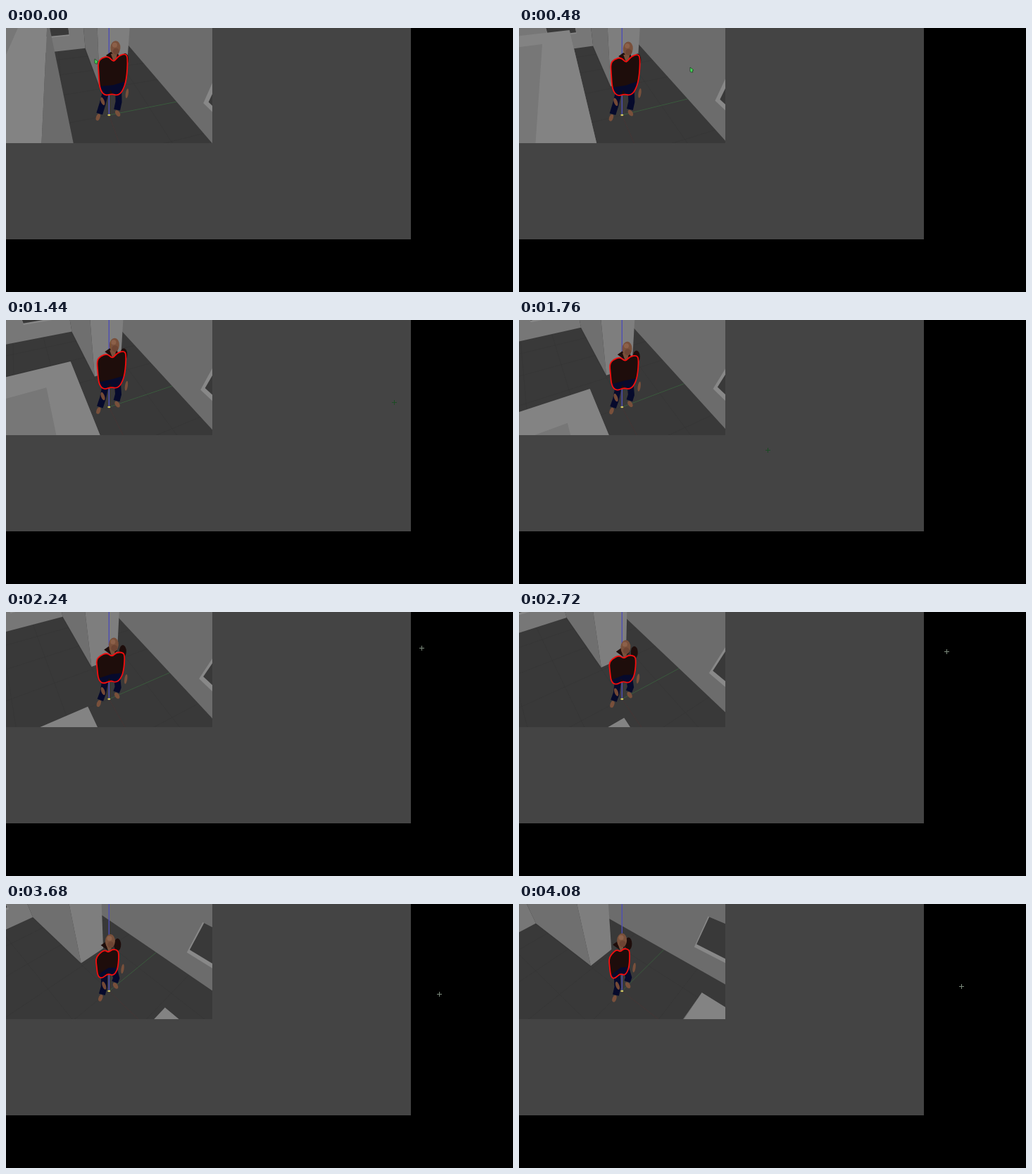
Recreate the animation shown at these times as an HTML page with a canvas. Size 720 px wide and 376 px high, loop 4.16 s.

```html
<!DOCTYPE html>
<html lang="en">
<head>
<meta charset="utf-8">
<title>Orbiting viewport</title>
<style>
html, body { margin: 0; width: 100%; height: 100%; overflow: hidden; background: #000; }
canvas { display: block; }
</style>
</head>
<body>
<canvas id="stage" width="720" height="376"></canvas>
<script>
const ctx = document.getElementById('stage').getContext('2d');
const LOOP = 4160, STEP = 80;
const VIEW = { w: 293, h: 164 };
const FOCAL = 248, PIVOT_DROP = 42, NEAR = 0.03;

// Room, in units of the camera distance: g along the green axis, b against the red one
const WALL_G = 0.437, WALL_B = 0.922, HIGH = 0.8;
const PILLAR = { g0: 0.006, g1: 0.197, b: 0.272 };
const BLOCK = { g: -0.2025, b: -0.338, top: 0.649, rim: 0.042 };
const REST = { from: 1120, length: 240 };

// Time, yaw and pitch of the orbit
const ORBIT = [
  [0, 15, 37], [480, 18, 39], [960, 21, 41.8], [1520, 24, 47.3],
  [2000, 26.5, 50], [3040, 37, 52.4], [3840, 48.5, 50.5]
];
// Time, x and y of the pointer
const POINTER = [
  [0, 128, 48], [480, 245, 60], [960, 421, 80], [1120, 590, 92], [1360, 600, 100],
  [1760, 353, 185], [1840, 380, 203], [2240, 590, 51], [3040, 619, 60],
  [3280, 584, 31], [3600, 622, 50], [3840, 600, 284], [4080, 628, 117]
];
// Sweater outline as g, z
const SWEATER = [
  [-0.043, 0.329], [-0.025, 0.35], [0.009, 0.354], [0.034, 0.317], [0.057, 0.35],
  [0.091, 0.357], [0.106, 0.335], [0.108, 0.2], [0.088, 0.124], [0.061, 0.1],
  [0.029, 0.12], [-0.015, 0.115], [-0.041, 0.172], [-0.042, 0.269]
];

const clamp = k => Math.min(1, Math.max(0, k));
const mix = (a, b, k) => a + (b - a) * k;

function blend(keys, t) {
  let i = 0;
  while (i < keys.length - 2 && t >= keys[i + 1][0]) i++;
  const [from, to] = [keys[i], keys[i + 1]];
  const k = clamp((t - from[0]) / (to[0] - from[0]));
  return from.slice(1).map((v, j) => mix(v, to[j + 1], k));
}

let sinYaw, cosYaw, sinPitch, cosPitch;

function aim(t) {
  const rested = Math.min(Math.max(t - REST.from, 0), REST.length);
  const [yaw, pitch] = blend(ORBIT, t - rested).map(a => a * Math.PI / 180);
  [sinYaw, cosYaw, sinPitch, cosPitch] = [Math.sin(yaw), Math.cos(yaw), Math.sin(pitch), Math.cos(pitch)];
}

// World to camera: right, up, depth
function toCamera([g, b, z]) {
  const away = g * sinYaw + b * cosYaw;
  return [g * cosYaw - b * sinYaw, z * cosPitch + away * sinPitch, 1 + away * cosPitch - z * sinPitch];
}

const toScreen = ([u, v, d]) => [146.3 + FOCAL * u / d, 82 + (PIVOT_DROP - FOCAL * v) / d];
const project = (g, b, z) => toScreen(toCamera([g, b, z]));

function clipNear(points) {
  const kept = [];
  points.forEach((p, i) => {
    const q = points[(i + 1) % points.length];
    if (p[2] >= NEAR) kept.push(p);
    if ((p[2] >= NEAR) !== (q[2] >= NEAR)) {
      const k = (NEAR - p[2]) / (q[2] - p[2]);
      kept.push(p.map((v, j) => mix(v, q[j], k)));
    }
  });
  return kept;
}

function trace(points, closed = true) {
  ctx.beginPath();
  points.forEach(([x, y]) => ctx.lineTo(x, y));
  if (closed) ctx.closePath();
}

function fill(color, points) {
  trace(points);
  ctx.fillStyle = color;
  ctx.fill();
}

function stroke(color, width, points) {
  trace(points, false);
  ctx.strokeStyle = color;
  ctx.lineWidth = width;
  ctx.stroke();
}

function oval(color, [x, y], rx, ry, turn = 0) {
  ctx.beginPath();
  ctx.ellipse(x, y, rx, ry, turn, 0, Math.PI * 2);
  ctx.fillStyle = color;
  ctx.fill();
}

const flatten = corners => clipNear(corners.map(toCamera)).map(toScreen);
const face = (color, ...corners) => fill(color, flatten(corners));
const segment = (color, width, a, b) => stroke(color, width, flatten([a, b]));

const wallAcross = (b, g0, g1, z0, z1) => [[g0, b, z0], [g1, b, z0], [g1, b, z1], [g0, b, z1]];
const wallAlong = (g, b0, b1, z0, z1) => [[g, b0, z0], [g, b1, z0], [g, b1, z1], [g, b0, z1]];

// An opening whose dark pane sits a little deeper in the wall
function recess(plane, depth, ...bounds) {
  ctx.save();
  face('#888', ...plane(depth, ...bounds));
  ctx.clip();
  face('#393939', ...plane(depth + 0.03, ...bounds));
  ctx.restore();
}

function drawRoom() {
  ctx.fillStyle = '#393939';
  ctx.fillRect(0, 0, VIEW.w, VIEW.h);
  for (let i = -4; i <= 4; i++) {
    const at = i * 0.25;
    segment('#353535', 0.6, [at, -0.5, 0], [at, 1, 0]);
    segment('#353535', 0.6, [-1, at, 0], [1, at, 0]);
  }
  segment('#4d3737', 0.7, [0, 0, 0], [0, -0.45, 0]);
  segment('#3d6540', 0.8, [0, 0, 0], [WALL_G, 0, 0]);

  face('#777', ...wallAcross(WALL_B, -2, PILLAR.g0, 0, HIGH));
  recess(wallAcross, WALL_B, -0.37, -0.129, 0.14, 0.4);
  face('#6c6c6c', ...wallAlong(WALL_G, -1, 2, 0, HIGH));
  recess(wallAlong, WALL_G, -0.6, -0.177, 0.146, 0.36);

  const { g0, g1, b } = PILLAR;
  face('#6f6f6f', ...wallAlong(g0, b, WALL_B, 0, HIGH));
  face('#7e7e7e', ...wallAcross(b, g0, g1, 0, HIGH));

  face('#6b6b6b', ...wallAlong(BLOCK.g, BLOCK.b, -2, 0, BLOCK.top));
  const lid = inset => [[-2, -2], [BLOCK.g - inset, -2], [BLOCK.g - inset, BLOCK.b - inset], [-2, BLOCK.b - inset]]
    .map(([x, y]) => [x, y, BLOCK.top]);
  face('#838383', ...lid(0));
  face('#777', ...lid(BLOCK.rim));

  segment('#4e4eb4', 1.4, [0, 0, 0], [0, 0, 0.7]);
}

function smooth(points) {
  const n = points.length;
  const mid = i => points[i % n].map((v, j) => (v + points[(i + 1) % n][j]) / 2);
  ctx.beginPath();
  ctx.moveTo(...mid(0));
  for (let i = 1; i <= n; i++) ctx.quadraticCurveTo(...points[i % n], ...mid(i));
  ctx.closePath();
}

const shift = ([x, y], dx, dy) => [x + dx, y + dy];

function drawFigure(t) {
  const skin = '#79503b', cloth = '#1e0d0b', denim = '#060a2c';
  // The body sinks and its far shoulder drops behind the chest
  const sink = clamp((t - REST.from) / 2160);
  const body = (g, b, z) => project(g, b, z * (1 - 0.12 * sink));
  const sag = ([g, z]) => body(g, 0.04, z - 1.2 * sink * Math.max(0, g - 0.03));
  const footL = project(-0.064, 0, 0), footR = project(0.052, 0, 0);
  const neck = body(0.034, 0.04, 0.325), head = body(0.04, 0.036, 0.395);

  oval(cloth, body(0.092, 0.04, 0.325), 5, 9);
  oval(skin, body(0.1, 0, 0.14), 2, 7, 0.15);
  oval(skin, footL, 2.8, 5, 0.35);
  oval(skin, footR, 3, 5, -0.6);
  stroke(denim, 9, [body(-0.005, 0.03, 0.17), body(-0.035, 0, 0.1), shift(footL, 2, -5)]);
  stroke(denim, 9, [body(0.06, 0.03, 0.17), body(0.055, 0, 0.09), shift(footR, -1, -5)]);

  const outline = SWEATER.map(sag);
  smooth(outline);
  ctx.fillStyle = cloth;
  ctx.fill();
  ctx.save();
  ctx.clip();
  fill(denim, [[-0.1, 0.19], [0.034, 0.18], [0.15, 0.2], [0.15, 0], [0.04, 0.1], [0.02, 0.15], [0, 0.1], [-0.1, 0]].map(sag));
  ctx.restore();

  fill(cloth, [shift(neck, -11, -8), shift(neck, -4, -13), shift(neck, 6, -11), shift(neck, 8, -6), neck]);
  fill(skin, [shift(neck, -4, -10), shift(neck, 5, -12), shift(neck, 4, -3), shift(neck, 0, 1)]);
  oval(skin, head, 7, 10, 0.05);
  oval('#6d4433', shift(head, 1, 5), 4.5, 4.5);
  oval('#8c6049', shift(head, -1, -4), 3.5, 3.5);
  oval('#744936', body(-0.035, 0, 0.115), 2.5, 6, -0.35);

  smooth(outline);
  ctx.strokeStyle = '#f50d0d';
  ctx.lineWidth = 1.8;
  ctx.stroke();
  oval('#d2c860', project(0, 0, 0), 2, 1.2);
}

function drawPointer([x, y], cross) {
  if (cross) {
    const color = x > 575 ? '#7c8a7c' : '#1c4b24';
    stroke(color, 1, [[x - 3, y + 0.5], [x + 4, y + 0.5]]);
    stroke(color, 1, [[x + 0.5, y - 3], [x + 0.5, y + 4]]);
    return;
  }
  const arrow = [[-2, -4], [3, 0], [1, 1], [2, 3], [0, 3], [-2, 2], [-2, -4]].map(p => shift(p, x, y));
  fill('#48d95a', arrow);
  stroke('#15371a', 0.7, arrow);
}

function draw(t) {
  ctx.fillStyle = '#000';
  ctx.fillRect(0, 0, 720, 376);
  ctx.fillStyle = '#444';
  ctx.fillRect(0, 0, 575, 301);

  ctx.save();
  ctx.beginPath();
  ctx.rect(0, 0, VIEW.w, VIEW.h);
  ctx.clip();
  aim(t);
  drawRoom();
  drawFigure(t);
  ctx.restore();

  const cross = (t >= 1440 && t < 3040) || t >= 3680;
  drawPointer(blend(POINTER, t).map(Math.round), cross);
}

const start = performance.now();
function tick() {
  const t = (performance.now() - start) % LOOP;
  draw(Math.floor(t / STEP) * STEP);
  requestAnimationFrame(tick);
}
tick();
</script>
</body>
</html>
```
